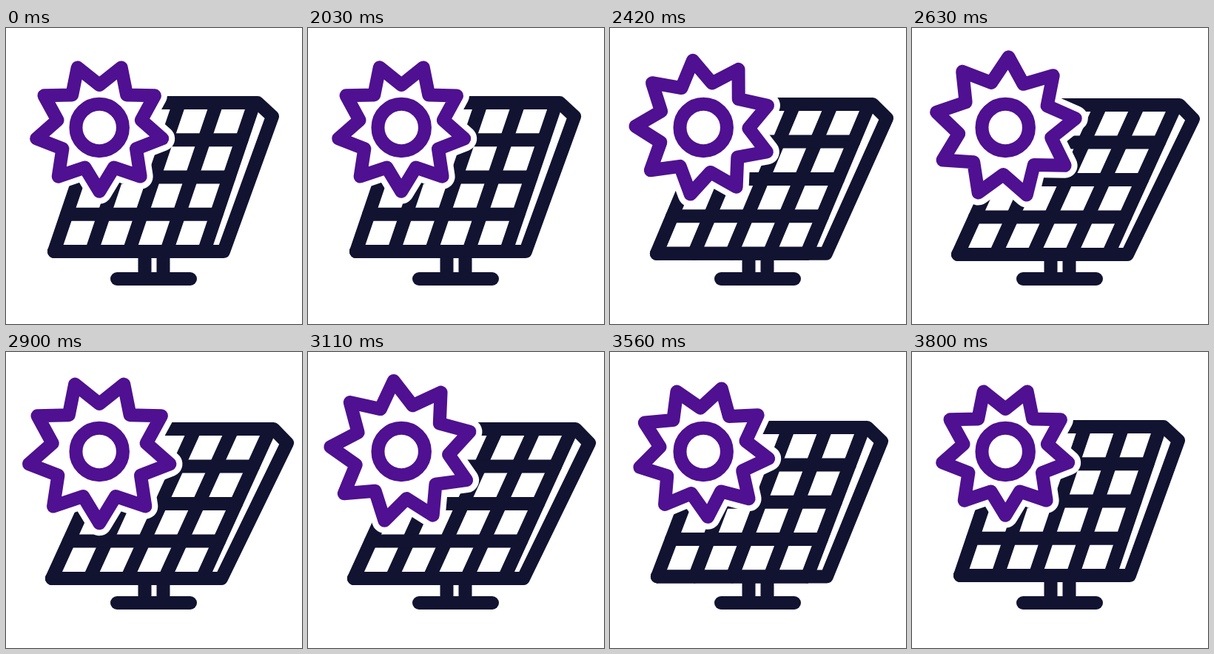
An HTML page with a canvas for the animation above (3830 ms loop, 400 by 400 pixels).

```html
<!DOCTYPE html>
<html lang="en">
<head>
<meta charset="utf-8">
<title>Solar panel</title>
<style>
  html, body { margin: 0; width: 100%; height: 100%; overflow: hidden; background: #fff; }
  canvas { display: block; width: 400px; height: 400px; }
</style>
</head>
<body>
<canvas id="stage" width="400" height="400"></canvas>
<script>
const ctx = document.getElementById('stage').getContext('2d');
const NAVY = '#121331', PURPLE = '#4f1091';
const LOOP = 3830, START = 2000, STEP = 30, STEPS = 60;
const LINE = 18, HALO = 34;
const SUN = { x: 126.2, y: 134.5 };

const mix = (a, b, k) => a + (b - a) * k;

function ease(a, b, v) {
  const u = Math.min(1, Math.max(0, (v - a) / (b - a)));
  return u * u * (3 - 2 * u);
}

// Rises until `up`, rests, then falls from `down` to the end
const swell = (n, up, down) => ease(0, up, n) - ease(down, STEPS, n);

function trace(points, closed) {
  ctx.beginPath();
  points.forEach(([x, y]) => ctx.lineTo(x, y));
  if (closed) ctx.closePath();
}

function stroke(color, width = LINE) {
  ctx.strokeStyle = color;
  ctx.lineWidth = width;
  ctx.stroke();
}

function bar(...points) {
  trace(points);
  stroke(NAVY);
}

function drawStand() {
  bar([187.5, 306], [187.5, 339]);
  bar([212.5, 306], [212.5, 339]);
  bar([150, 339], [249, 339]);
}

function drawPanel(k) {
  const top = mix(101, 104, k), bottom = mix(302, 306, k);
  const left = mix(65, 62, k), right = mix(267.5, 265, k);
  const lean = mix(68, 92, k);
  const apex = [mix(340, 361.5, k), top];
  const side = [mix(360, 380, k), mix(119.5, 123, k)];
  const foot = [mix(294, 291, k), bottom];

  for (let i = 0; i <= 4; i++) {
    const x = mix(left, right, i / 4);
    const y = mix(bottom, top, i / 4);
    const shift = lean * i / 4;
    bar([x, bottom], [x + lean, top]);
    bar([left + shift, y], [right + shift, y]);
  }
  bar([left + lean, top], apex, side, foot, [left, bottom]);
}

function drawSun(turn, k) {
  const outer = mix(86.3, 96.7, k);
  const star = [];
  for (let i = 0; i < 18; i++) {
    const a = (90 + turn + i * 20) * Math.PI / 180;
    const r = i % 2 ? outer * 0.666 : outer;
    star.push([SUN.x + r * Math.cos(a), SUN.y + r * Math.sin(a)]);
  }
  trace(star, true);
  ctx.fillStyle = '#fff';
  ctx.fill();
  stroke('#fff', HALO);
  stroke(PURPLE);

  ctx.beginPath();
  ctx.arc(SUN.x, SUN.y, 31.75, 0, Math.PI * 2);
  stroke(PURPLE);
}

function draw(time) {
  const t = time % LOOP;
  const n = Math.min(STEPS, Math.max(0, Math.floor((t - START) / STEP + 0.001)));
  ctx.fillStyle = '#fff';
  ctx.fillRect(0, 0, 400, 400);
  ctx.lineCap = ctx.lineJoin = 'round';
  drawStand();
  drawPanel(swell(n, 22, 40));
  drawSun(80 * ease(0, STEPS, n), swell(n, 27, 33));
}

const begin = performance.now();
function tick() {
  draw(performance.now() - begin);
  requestAnimationFrame(tick);
}
tick();
</script>
</body>
</html>
```
